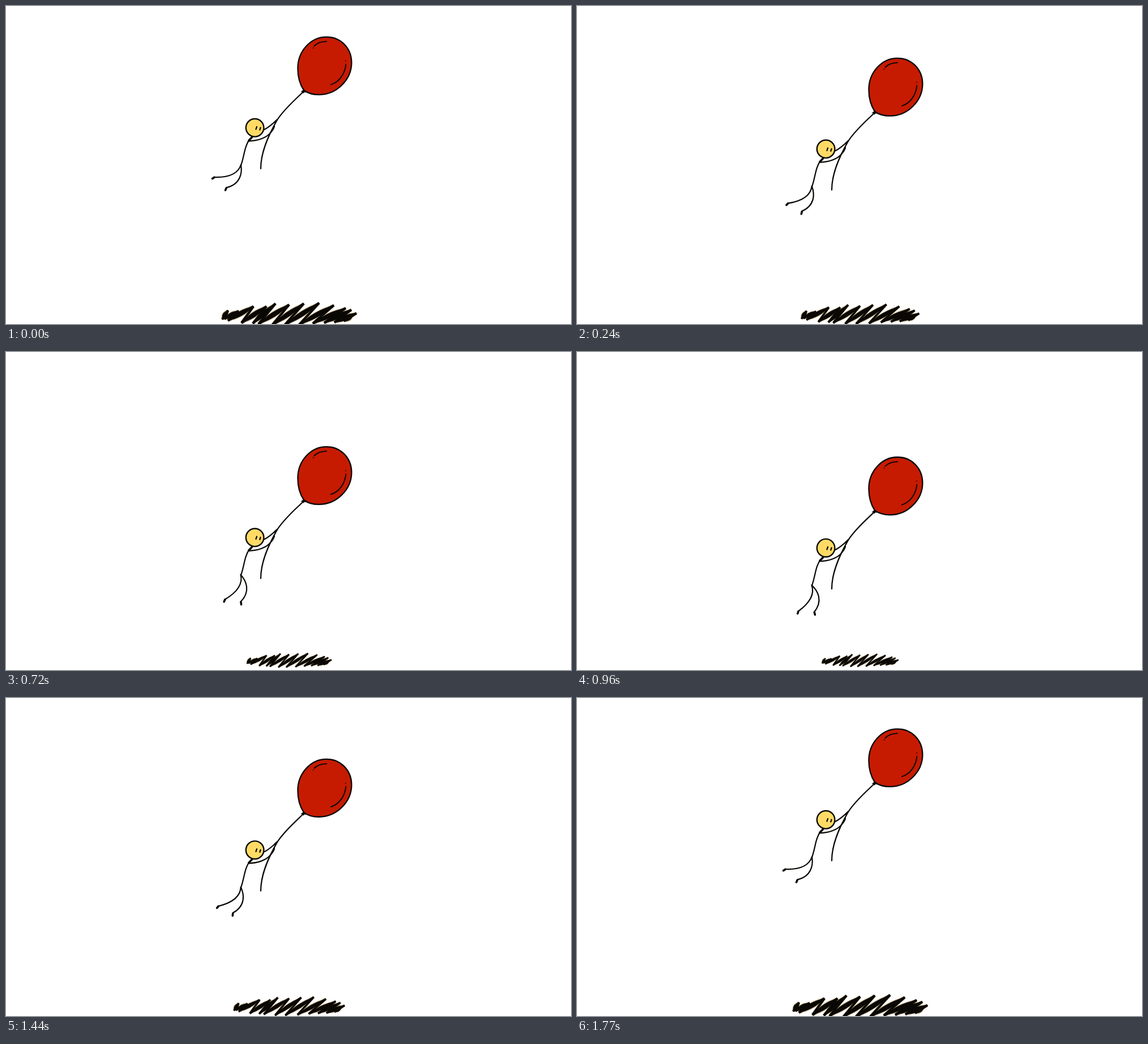
An HTML page with a canvas that plays this animation: 998x561 px, repeating every 1.8 s.

```html
<!DOCTYPE html>
<html lang="en">
<head>
<meta charset="utf-8">
<title>Balloon flight</title>
<style>
html, body { margin: 0; width: 100%; height: 100%; overflow: hidden; background: #fff; }
canvas { display: block; }
</style>
</head>
<body>
<canvas id="stage" width="998" height="561"></canvas>
<script>
const ctx = document.getElementById('stage').getContext('2d');
const INK = '#0a0804', RED = '#c61b01', SKIN = '#ffdb66';
const LOOP = 1800, STEP = 30, TURN = 900;
const DROP = 140.6, SWING = 40.8 * Math.PI / 180, SHRINK = 0.463;
const HIP = [415, 281];

const BALLOON = new Path2D('M566 54.6C591 54.6 610.4 74 610.4 100C610.4 130 584 156.4 553 156.4' +
  'C542 156.4 533 154 526 148.5C519 138 515.4 124 515.4 110C515.4 80 538 54.6 566 54.6Z');
const SHINE = new Path2D('M544.5 70.5Q552 63 566 62.6M600.3 103C599 119 589 134 574 138.6');
const KNOT = new Path2D('M526 147L520.5 151.5L524.5 152L525 154.5L527.5 152L529.5 153L528.5 149Z');
const STRING = new Path2D('M525 151.5C512 164 492 181 479 201C463 229 450 258 450 287');
const ARMS = new Path2D('M455 218.5C464 215 470 208 479 201M428 238.3C446 238 459 232 465 226C470 221 473 217 474 212');
const HANDS = new Path2D('M474.5 205L479 200.5M471 218L473.7 212.5');
const BODY = new Path2D('M430.5 235C421 247 421 265 415 281');
const NECK = new Path2D('M434.5 231.5L428.8 237.5');
const EYES = new Path2D('M443 213L441.5 217.5M449.6 214.5L448.3 218.5');
const LEGS = new Path2D('M415 280C410 296 394 303 367 302M415 280C417.5 295 414 315 389 320.5');
const FEET = new Path2D('M368 302.2L364.5 304.5M389.3 321L387.5 325');

// Scribble strokes: bottom x, y, top x, y
const SCRIBBLE = [
  [382, 553, 392, 537], [386, 552, 411, 538], [392, 555, 437, 530],
  [416, 559, 460, 530], [436, 560, 476, 525], [446, 561, 500, 527],
  [470, 563, 526, 525], [492, 563, 553, 524], [518, 562, 579, 528],
  [542, 560, 600, 533], [562, 559, 610, 536], [580, 558, 619, 542],
  [597, 556, 613, 545]
];

// Each stroke is a slim blade; a thin zigzag joins them
function scribblePaths() {
  const blades = new Path2D(), zigzag = new Path2D();
  for (const [x0, y0, x1, y1] of SCRIBBLE) {
    const dx = x1 - x0, dy = y1 - y0;
    const bulge = 8.5 / Math.hypot(dx, dy);
    const mx = (x0 + x1) / 2, my = (y0 + y1) / 2;
    blades.moveTo(x0, y0);
    blades.quadraticCurveTo(mx + dy * bulge, my - dx * bulge, x1, y1);
    blades.quadraticCurveTo(mx - dy * bulge, my + dx * bulge, x0, y0);
    zigzag.lineTo(x0, y0);
    zigzag.lineTo(x1, y1);
  }
  return [blades, zigzag];
}
const [BLADES, ZIGZAG] = scribblePaths();

function line(path, width) {
  ctx.lineWidth = width;
  ctx.stroke(path);
}

function dot(x, y, r) {
  ctx.beginPath();
  ctx.arc(x, y, r, 0, Math.PI * 2);
  ctx.fill();
}

function drawShadow(scale) {
  ctx.save();
  ctx.translate(500, 544.5);
  ctx.scale(scale, scale);
  ctx.translate(-500, -544.5);
  ctx.lineJoin = 'bevel';
  ctx.strokeStyle = '#a8946a';
  line(BLADES, 2);
  line(ZIGZAG, 5);
  ctx.strokeStyle = ctx.fillStyle = INK;
  ctx.fill(BLADES);
  line(ZIGZAG, 4);
  ctx.restore();
}

function drawLegs(angle) {
  ctx.save();
  ctx.translate(...HIP);
  ctx.rotate(-angle);
  ctx.translate(-HIP[0], -HIP[1]);
  line(LEGS, 2.2);
  line(FEET, 3.6);
  ctx.restore();
}

function drawFlyer(drop, angle) {
  ctx.save();
  ctx.translate(0, drop);
  ctx.strokeStyle = INK;
  ctx.lineCap = ctx.lineJoin = 'round';

  line(STRING, 2.2);
  ctx.fillStyle = RED;
  ctx.fill(BALLOON);
  line(BALLOON, 2.3);
  line(SHINE, 2);
  ctx.fillStyle = INK;
  dot(542.7, 74, 0.9);
  dot(600, 97, 0.9);
  ctx.fill(KNOT);

  line(BODY, 2.2);
  drawLegs(angle);
  line(ARMS, 2.2);
  line(HANDS, 2.8);
  line(NECK, 3.6);

  ctx.fillStyle = SKIN;
  dot(439.6, 214.8, 15.8);
  ctx.lineWidth = 2.4;
  ctx.stroke();
  line(EYES, 2.3);
  ctx.restore();
}

function draw(now) {
  const t = Math.floor((now % LOOP) / STEP) * STEP;
  const k = t <= TURN ? t / TURN : (LOOP - STEP - t) / (LOOP - STEP - TURN);
  ctx.fillStyle = '#fff';
  ctx.fillRect(0, 0, 998, 561);
  drawShadow(1 - SHRINK * k);
  drawFlyer(DROP * k, SWING * k);
}

let start;
function tick(now) {
  if (start === undefined) start = now;
  draw(now - start);
  requestAnimationFrame(tick);
}
draw(0);
requestAnimationFrame(tick);
</script>
</body>
</html>
```
